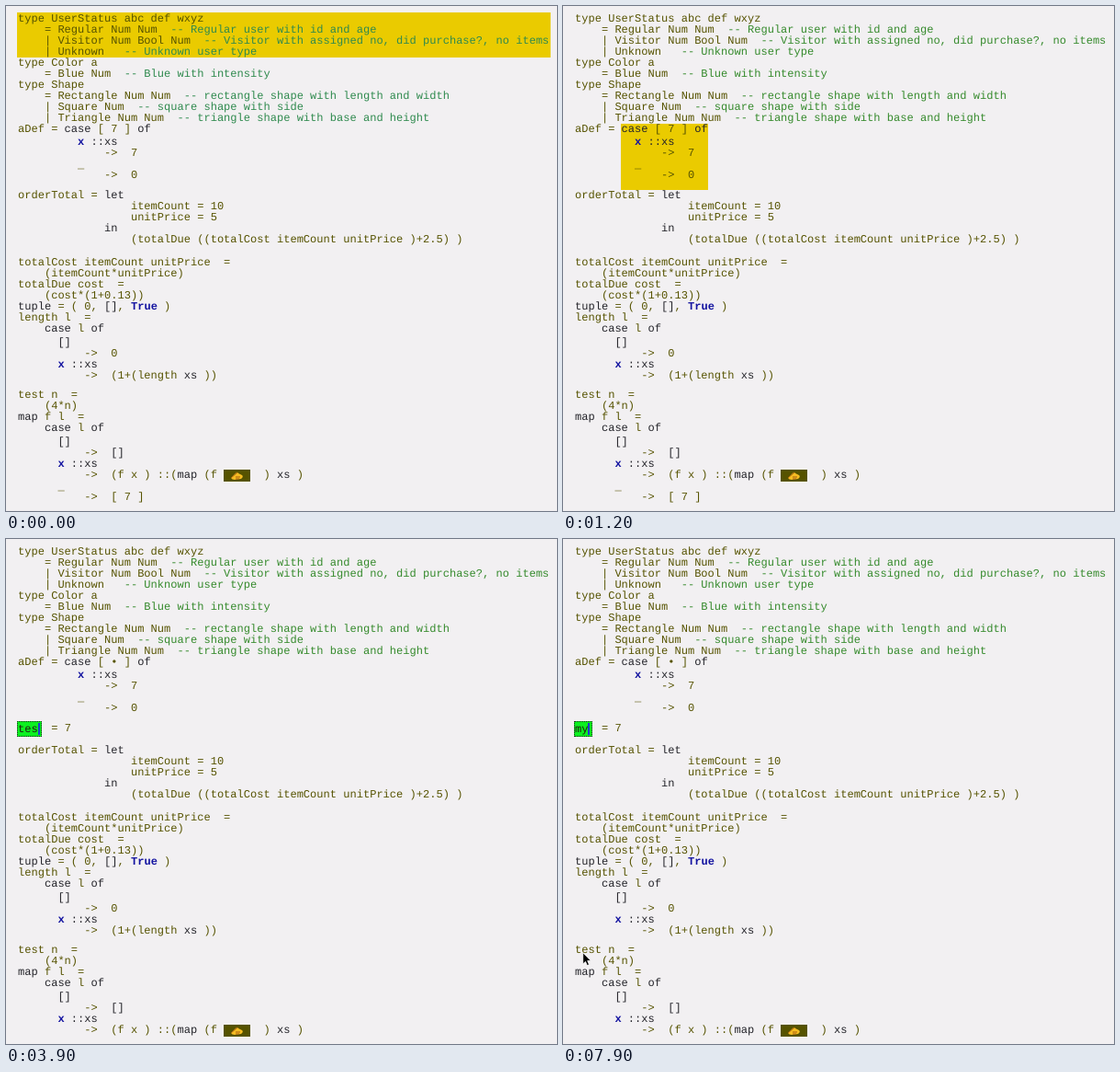
An HTML page for the animation above (8 s loop, 600 px wide and 549 px high).

```html
<!DOCTYPE html>
<html lang="en">
<head>
<meta charset="utf-8">
<title>Code editor</title>
<style>
  html, body { margin: 0; width: 100%; height: 100%; overflow: hidden; background: #f2f0f2; }
  #stage {
    position: relative; width: 600px; height: 549px; overflow: hidden;
    font: 12.06px/12px "Liberation Mono", "Courier New", monospace;
    color: #565300; text-rendering: geometricPrecision;
  }
  #stage > *, .line, .hole { position: absolute; }
  .line { left: 13px; white-space: pre; }
  .note { color: #358a2c; }
  .key { color: #24242a; }
  .pat { color: #1414a0; font-weight: bold; }
  #mark { background: #eacb00; }
  #mark.first ~ #top .note { color: #2f8a4e; }
  #rest { left: 0; top: 0; }
  .hole { left: 237px; top: 504px; width: 29px; height: 13px; background: #565300; }
  .hole svg { position: absolute; left: 7px; top: 1px; }
  #name {
    left: 12px; top: 198px; height: 17px; box-sizing: border-box;
    border: 1px dotted #222; padding: 2px 0 0; color: #201c10; white-space: pre;
  }
  #name i { position: absolute; top: 1px; width: 2px; height: 13px; background: #2038d0; }
  #name.empty { border: 0; }
  #name.empty i { left: 0; top: 1px; width: 3px; height: 15px; background: #3a48d8; }
  #value { top: 200px; }
</style>
</head>
<body>
<div id="stage">
  <div id="mark"></div>
  <div id="top"></div>
  <div id="rest">
    <div class="hole">
      <svg width="15" height="11" viewBox="0 0 15 11">
        <path d="M1 8 L6 3 Q8 1 9 3 L13 5 Q15 7 12 9 L5 10 Q2 10 1 8Z" fill="#f5bd22"/>
        <path d="M1 8 L8 2 M6 7 H11 M6 9 H10" stroke="#a85f10" fill="none"/>
      </svg>
    </div>
  </div>
  <div id="name"><span></span><i></i></div>
  <div id="value" class="line"> = 7</div>
  <svg id="mouse" width="12" height="18" viewBox="0 0 12 18">
    <path d="M.7 .8 V13 L3.5 10.4 L5.3 14.6 L7.5 13.7 L5.7 9.6 H9.4Z" fill="#000" stroke="#fff" stroke-width=".8"/>
  </svg>
</div>
<script>
const $ = id => document.getElementById(id);
const CHAR = 7.237, LOOP = 8000, EXTRACT = 2800;

// Each row: vertical centre, column, text
const rows = [
  [13.5, 0, "type UserStatus abc def wxyz"],
  [25.5, 4, "= Regular Num Num  -- Regular user with id and age"],
  [37.5, 4, "| Visitor Num Bool Num  -- Visitor with assigned no, did purchase?, no items"],
  [49.5, 4, "| Unknown   -- Unknown user type"],
  [61.5, 0, "type Color a"],
  [73.5, 4, "= Blue Num  -- Blue with intensity"],
  [85.5, 0, "type Shape"],
  [97.5, 4, "= Rectangle Num Num  -- rectangle shape with length and width"],
  [109.5, 4, "| Square Num  -- square shape with side"],
  [121.5, 4, "| Triangle Num Num  -- triangle shape with base and height"],
  [133.5, 0, "aDef = case [ 7 ] of"],
  [148, 9, "x ::xs"],
  [160, 13, "->  7"],
  [172.5, 9, "_"],
  [184, 13, "->  0"],
  [206, 0, "orderTotal = let"],
  [218, 17, "itemCount = 10"],
  [230, 17, "unitPrice = 5"],
  [242, 13, "in"],
  [254, 17, "(totalDue ((totalCost itemCount unitPrice )+2.5) )"],
  [278.5, 0, "totalCost itemCount unitPrice  ="],
  [290.5, 4, "(itemCount*unitPrice)"],
  [302.5, 0, "totalDue cost  ="],
  [314.5, 4, "(cost*(1+0.13))"],
  [326.5, 0, "tuple = ( 0, [], True )"],
  [338.5, 0, "length l  ="],
  [350.5, 4, "case l of"],
  [366, 6, "[]"],
  [377.5, 10, "->  0"],
  [389.5, 6, "x ::xs"],
  [401.5, 10, "->  (1+(length xs ))"],
  [423, 0, "test n  ="],
  [435, 4, "(4*n)"],
  [447, 0, "map f l  ="],
  [459, 4, "case l of"],
  [474, 6, "[]"],
  [486, 10, "->  []"],
  [498, 6, "x ::xs"],
  [510, 10, "->  (f x ) ::(map (f       ) xs )"],
  [522.5, 6, "_"],
  [534, 10, "->  [ 7 ]"]
];

const tokens = /(-- .*)|(\bx(?= ::xs)|\bTrue\b)|(\b(?:case|of|let|in|tuple|map|xs)\b|::xs|\[\])/g;
const paint = text => text.replace(tokens, (all, note, pat) =>
  `<span class="${note ? "note" : pat ? "pat" : "key"}">${all}</span>`);

let subject;
for (const [y, col, text] of rows) {
  const line = document.createElement("div");
  line.className = "line";
  line.style.top = y - 6 + "px";
  line.innerHTML = " ".repeat(col) + paint(text);
  $(y < 200 ? "top" : "rest").append(line);
  if (text.startsWith("aDef")) {
    line.innerHTML = line.innerHTML.replace("7", "<b style='font-weight:400'>7</b>");
    subject = line.querySelector("b");
  }
}

// Selection: start time, then left, top, right, bottom
const marks = [
  [0, 12, 7, 593, 56],
  [200, 12, 56, 288, 80],
  [400, 12, 80, 484, 128],
  [600, 12, 128, 158, 200],
  [1000, 12, 128, 42, 140],
  [1200, 63, 128, 158, 200],
  [1500, 100, 128, 136, 140],
  [2100, 114, 128, 122, 140]
];

const typing = [
  [EXTRACT, ""], [3400, "t"], [3600, "te"], [3900, "tes"], [4200, "test"],
  [5900, "tes"], [6100, "te"], [6300, "t"], [6500, ""], [7000, "m"], [7400, "my"]
];

// Pointer tip: time, x, y
const path = [[4500, 80, 520], [5000, 36, 465], [5350, 21, 448.5], [LOOP, 21, 448.5]];

const latest = (list, t) => list.filter(item => item[0] <= t).pop();

function drawMark(t) {
  const [start, left, top, right, bottom] = latest(marks, t);
  const mark = $("mark");
  mark.className = start ? "" : "first";
  mark.style.cssText =
    `left:${left}px;top:${top}px;width:${right - left}px;height:${bottom - top}px`;
}

function drawName(t) {
  const text = latest(typing, t)[1], box = $("name");
  const width = text.length * CHAR;
  box.className = text ? "" : "empty";
  box.firstChild.textContent = text;
  box.style.width = width + 5.5 + "px";
  box.style.background = !text ? "#d8201c" : text === "test" ? "#ff1208" : "#0cf020";
  box.lastChild.style.left = text ? width + "px" : "0";
  $("value").style.left = 13 + CHAR + width + "px";
}

function drawMouse(t) {
  const shown = t >= path[0][0];
  $("mouse").style.display = shown ? "" : "none";
  if (!shown) return;
  const next = path.findIndex(p => p[0] > t);
  const [t0, x0, y0] = path[next - 1], [t1, x1, y1] = path[next];
  const k = (t - t0) / (t1 - t0);
  $("mouse").style.left = x0 + (x1 - x0) * k + "px";
  $("mouse").style.top = y0 + (y1 - y0) * k + "px";
}

function draw() {
  const t = performance.now() % LOOP;
  const extracted = t >= EXTRACT;
  subject.textContent = extracted ? "•" : "7";
  $("rest").style.top = extracted ? "24.2px" : "0";
  $("mark").hidden = extracted;
  for (const id of ["name", "value"]) $(id).style.display = extracted ? "" : "none";
  if (extracted) {
    $("mark").style.display = "none";
    drawName(t);
  } else {
    drawMark(t);
  }
  drawMouse(t);
  requestAnimationFrame(draw);
}
draw();
</script>
</body>
</html>
```
